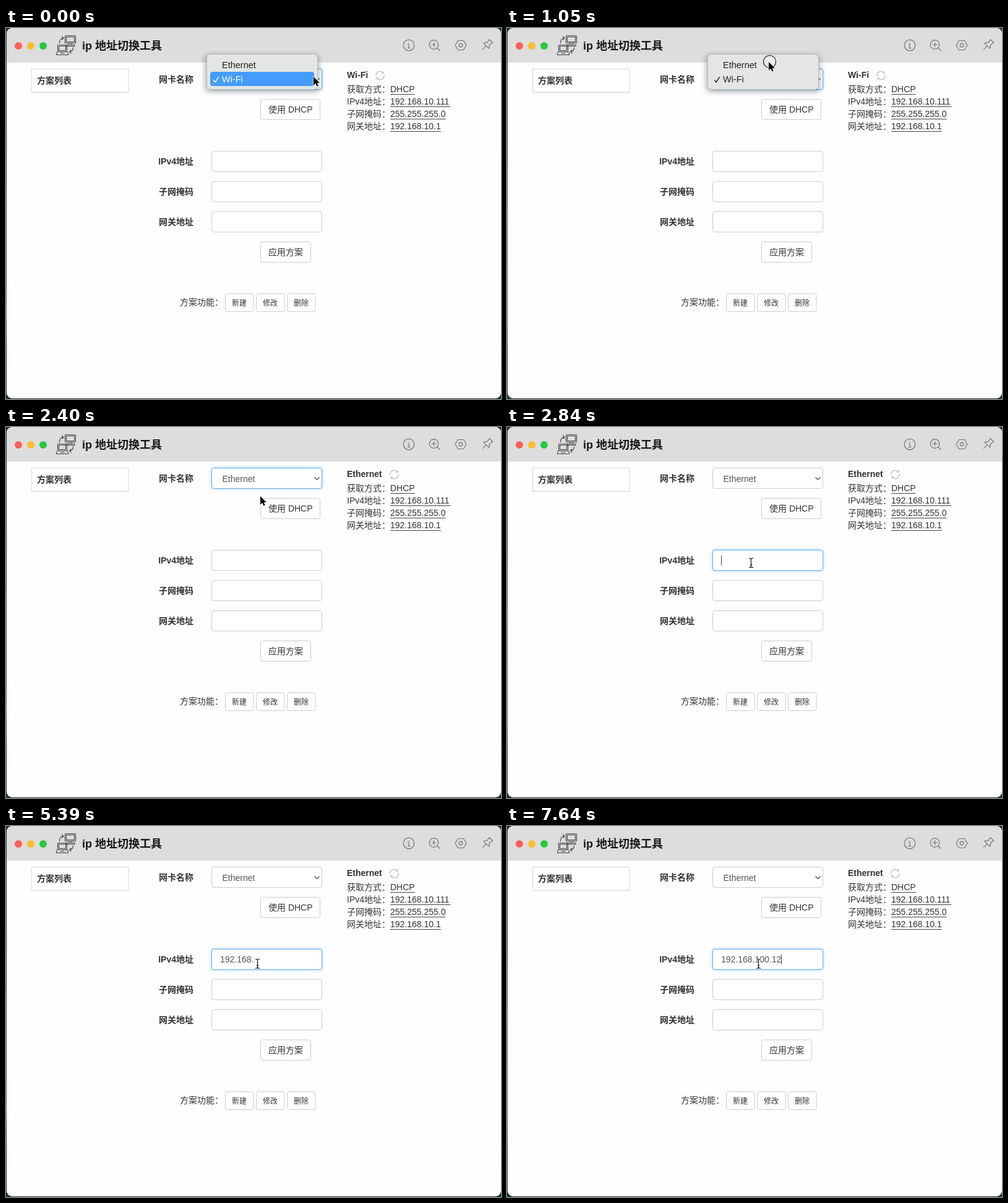
Recreate the animation shown at these times as an HTML page. Size 800 px wide and 601 px high, loop 8000 ms.

```html
<!DOCTYPE html>
<html lang="zh-CN">
<head>
<meta charset="utf-8">
<title>ip 地址切换工具</title>
<style>
html, body { margin: 0; width: 100%; height: 100%; overflow: hidden; background: #fefefe; }
svg { display: block; width: 800px; height: 601px; }
text { font: 14px "Liberation Sans", "Noto Sans CJK SC", "Noto Sans CJK", sans-serif; fill: #333; white-space: pre; }
.bold { font-weight: 700; }
.small { font-size: 12px; }
.title { font-size: 18px; font-weight: 700; fill: #161616; }
.field { fill: #555; }
.menu { font-size: 14.5px; fill: #222; }
.box { fill: #fff; stroke: #ccc; }
.focus { stroke: #66afe9; }
.tool, .device { fill: none; stroke-linecap: round; stroke-linejoin: round; }
.tool { stroke: #757575; stroke-width: 1.2; }
.device { stroke: #3d4248; stroke-width: 1.1; }
</style>
</head>
<body>
<svg viewBox="0 0 800 601" xmlns="http://www.w3.org/2000/svg">
  <defs>
    <linearGradient id="desk" x1="0" y1="0" x2="0" y2="1">
      <stop offset="0" stop-color="#16323a"/>
      <stop offset=".3" stop-color="#1c3a3c"/>
      <stop offset=".5" stop-color="#5a5330"/>
      <stop offset=".78" stop-color="#6b5a2c"/>
      <stop offset=".88" stop-color="#123a48"/>
      <stop offset="1" stop-color="#1b3433"/>
    </linearGradient>
    <clipPath id="frame"><rect x="1" y="0" width="799" height="600" rx="9"/></clipPath>
    <filter id="glow" x="-10%" y="-50%" width="120%" height="200%"><feGaussianBlur stdDeviation="2.6"/></filter>
    <filter id="shade" x="-20%" y="-50%" width="140%" height="200%"><feGaussianBlur stdDeviation="4"/></filter>
  </defs>

  <rect width="800" height="601" fill="url(#desk)"/>
  <g clip-path="url(#frame)">
    <rect width="800" height="601" fill="#fefefe"/>
    <rect width="800" height="56" fill="#ddd"/>
  </g>

  <circle cx="20" cy="29" r="6" fill="#ff5f57"/>
  <circle cx="40" cy="29" r="6" fill="#febc2e"/>
  <circle cx="60" cy="29" r="6" fill="#28c840"/>

  <g class="device">
    <rect x="95.5" y="12.5" width="17" height="12" rx="1"/>
    <rect x="97.5" y="14.5" width="13" height="8"/>
    <path d="M102 24.5v3m4-3v3M97 29.500v-2h14v2z"/>
    <rect x="83.500" y="27.500" width="15" height="11" rx="1"/>
    <rect x="85.500" y="29.500" width="11" height="7"/>
    <path d="M83.500 38.500l-2 2.500v2.500h19V41l-2-2.500M88 41h6"/>
    <path d="M86.500 24.500q0-8 6.500-8m-2.500-2.500l2.500 2.500-2.500 2.500M108.500 31.500q0 7-6 7m2.500-2.500l-2.500 2.500 2.500 2.500"/>
  </g>
  <text class="title" x="123" y="34.500">ip 地址切换工具</text>

  <g class="tool">
    <circle cx="651" cy="28" r="8.800"/>
    <path d="M651 23.500v.3M649.500 26.500h1.500v6m-2 0h4"/>
    <circle cx="691.500" cy="27" r="7.300"/>
    <path d="M688 27h7m-3.500-3.500v7M697 32.500l4 4"/>
    <path d="M730.500 20.500h9l4.500 7.500-4.500 7.500h-9l-4.500-7.500z"/>
    <circle cx="735" cy="28" r="2.800"/>
    <path transform="translate(777.500 27.500) rotate(45)" d="M-4-9H4L3-7.500V-2Q6-.5 6 2H-6Q-6-.5-3-2V-7.500zM0 2V10"/>
  </g>

  <rect x="41" y="104" width="158" height="1" fill="#e2e2e2"/>
  <rect class="box" x="41.500" y="66.500" width="156.500" height="37.500" style="stroke:#d8d8d8"/>
  <text class="bold" x="50" y="90">方案列表</text>

  <g class="bold" text-anchor="end">
    <text class="bold" x="303" y="88">网卡名称</text>
    <text class="bold" x="303" y="221">IPv4地址</text>
    <text class="bold" x="303" y="270">子网掩码</text>
    <text class="bold" x="303" y="319">网关地址</text>
  </g>

  <g id="inputs"></g>
  <text id="choice" class="field" x="349.500" y="89"></text>
  <path d="M498.500 81.500l4 4 4-4" fill="none" stroke="#444" stroke-width="1.200"/>
  <text id="typed" class="field" x="346" y="221"></text>
  <rect id="caret" y="208" width="1" height="16" fill="#444"/>

  <g id="buttons"></g>
  <text x="281" y="448.500">方案功能：</text>

  <text id="adapter" class="bold" x="551" y="81"></text>
  <g id="refresh" fill="none" stroke="#bdbdbd" stroke-width="1.200">
    <path d="M-6.500 1A6.500 6.500 0 0 1 5-4.200M6.500-1A6.500 6.500 0 0 1-5 4.200"/>
    <path d="M5.500-7v3.200H2.300M-5.500 7V3.800h3.200"/>
  </g>
  <g id="info"></g>

  <g id="menu">
    <rect x="321" y="43" width="185" height="61" rx="8" fill="#000" opacity=".26" filter="url(#shade)"/>
    <rect x="324.500" y="42.500" width="179" height="57" rx="6" fill="#e3e6e4" stroke="#b9bbba"/>
    <rect id="bar" x="330" width="168" height="23" rx="4" fill="#459cfb"/>
    <text id="first" class="menu" x="349" y="65">Ethernet</text>
    <text id="second" class="menu" x="349" y="88">Wi-Fi</text>
    <path id="check" d="M335.500 84.500l2.700 3.300 5-8" fill="none" stroke-width="1.500" stroke-linecap="round"/>
  </g>

  <circle id="ring" cx="424.500" cy="54.500" r="10" fill="#fff" fill-opacity=".3" stroke="#222" stroke-width="1.200"/>
  <path id="arrow" d="M0 0V13.800L3.200 10.800L5.400 15.600L7.700 14.600L5.600 9.900H9.800Z" fill="#000" stroke="#fff" stroke-width="1.100" paint-order="stroke"/>
  <g id="beam" fill="none" stroke-linecap="round">
    <path d="M-3-7.500Q0-7.500 0-5.500Q0-7.500 3-7.500M0-5.500V5.500M-3 7.500Q0 7.500 0 5.500Q0 7.500 3 7.500M-1.500 3H1.500" stroke="#fff" stroke-width="2.600"/>
    <path d="M-3-7.500Q0-7.500 0-5.500Q0-7.500 3-7.500M0-5.500V5.500M-3 7.500Q0 7.500 0 5.500Q0 7.500 3 7.500M-1.500 3H1.500" stroke="#111" stroke-width="1.200"/>
  </g>
</svg>
<script>
const LOOP = 8000;
const $ = id => document.getElementById(id);
const show = (id, on) => $(id).setAttribute('visibility', on ? 'visible' : 'hidden');
const move = (id, x, y) => $(id).setAttribute('transform', `translate(${x} ${y})`);

// Static form parts
$('inputs').innerHTML = [66, 199, 248, 297].map((y, i) =>
  `<rect id="glow${i}" x="332" y="${y}" width="179" height="34" rx="4" fill="#66afe9" opacity=".65" filter="url(#glow)"/>
   <rect id="input${i}" class="box" x="332.5" y="${y + .5}" width="178" height="33" rx="3.5"/>`).join('');

const button = (x, y, w, h, pad, base, label, cls = '') =>
  `<rect class="box" x="${x + .5}" y="${y + .5}" width="${w - 1}" height="${h - 1}" rx="3"/>
   <text class="${cls}" x="${x + pad}" y="${y + base}">${label}</text>`;
$('buttons').innerHTML =
  button(411, 115, 97, 34, 13, 22, '使用 DHCP') +
  button(411, 346, 82, 34, 13, 22, '应用方案') +
  ['新建', '修改', '删除'].map((s, i) => button(354 + i * 50, 430, 46.5, 30, 11, 19.5, s, 'small')).join('');

const width = s => [...s].reduce((w, c) => w + (c === '.' ? 3.89 : 7.786), 0);
$('info').innerHTML = [
  ['获取方式', 'DHCP', 39.6],
  ['IPv4地址', '192.168.10.111'],
  ['子网掩码', '255.255.255.0'],
  ['网关地址', '192.168.10.1']
].map(([name, value, w = width(value)], i) => {
  const y = 104 + i * 20;
  return `<text x="551" y="${y}">${name}：</text><text x="621" y="${y}">${value}</text>
    <rect x="621" y="${y + 3}" width="${w}" height="1" fill="#444"/>`;
}).join('');

// Stepped tracks: [start time, ...values]
const pointer = [
  [0, 497, 79], [300, 484, 74], [450, 446, 60], [600, 423, 55],
  [2250, 420, 66], [2400, 411, 112], [2550, 399, 176],
  [2700, 394.5, 217], [2840, 394.5, 220], [3140, 401, 222], [3290, 406.5, 223]
];
const highlight = [[0, 71], [450, 48], [1050, 0], [1200, 48]];
const opacity = [[0, 1], [1350, .05], [1500, 0]];
const typing = [
  [0, 0], [3740, 1], [4040, 2], [4190, 3], [4340, 4], [4490, 6], [4640, 7], [4940, 8],
  [5990, 9], [6140, 10], [6290, 11], [6590, 12], [7340, 13], [7640, 14]
];
const caretOn = [[0, 0], [2840, 1], [3290, 0], [3740, 1], [5390, 0], [5840, 1], [7040, 0], [7340, 1]];
const address = '192.168.100.12';

const at = (track, t) => track.filter(k => k[0] <= t).pop().slice(1);

function focus(i, on) {
  $('input' + i).setAttribute('class', on ? 'box focus' : 'box');
  show('glow' + i, on);
}

function draw(t) {
  const name = t < 1500 ? 'Wi-Fi' : 'Ethernet';
  $('choice').textContent = $('adapter').textContent = name;
  move('refresh', t < 1500 ? 604.5 : 627.5, 77);

  [0, 1, 2, 3].forEach(i => focus(i, i === (t < 2840 ? 0 : 1)));

  const [barY] = at(highlight, t);
  $('menu').setAttribute('opacity', at(opacity, t)[0]);
  $('bar').setAttribute('y', barY);
  $('bar').setAttribute('opacity', barY ? 1 : 0);
  $('first').style.fill = barY === 48 ? '#fff' : '#222';
  $('second').style.fill = barY === 71 ? '#fff' : '#222';
  $('check').setAttribute('stroke', barY === 71 ? '#fff' : '#222');

  const text = address.slice(0, at(typing, t)[0]);
  $('typed').textContent = text;
  $('caret').setAttribute('x', Math.floor(346 + width(text)));
  show('caret', at(caretOn, t)[0]);

  const [x, y] = at(pointer, t);
  move('arrow', x, y);
  move('beam', x, y);
  show('arrow', t < 2700);
  show('beam', t >= 2700);
  show('ring', t >= 1050 && t < 1200);
}

const start = performance.now();
function tick() {
  draw((performance.now() - start) % LOOP);
  requestAnimationFrame(tick);
}
draw(0);
requestAnimationFrame(tick);
</script>
</body>
</html>
```
